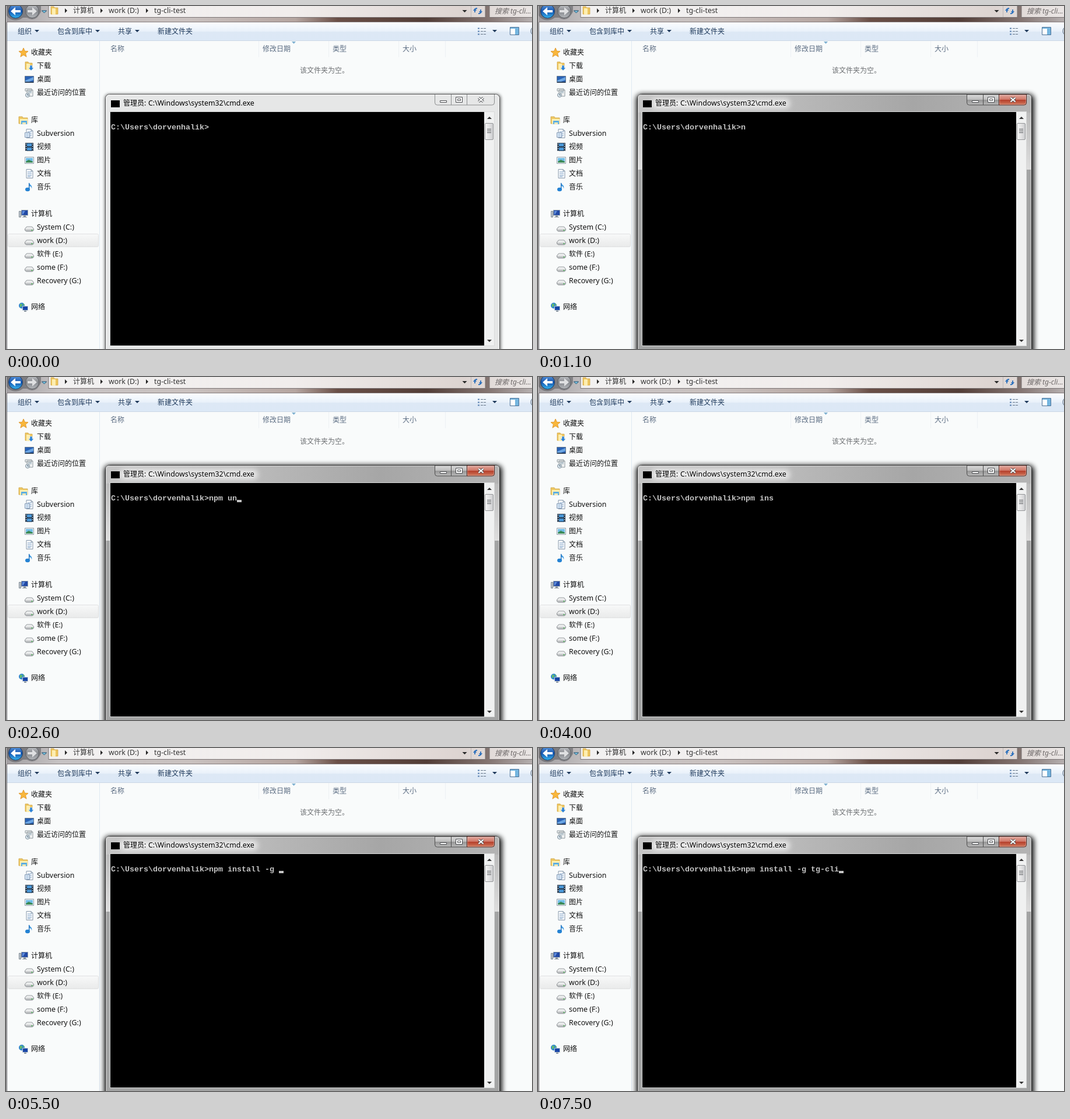
Write an HTML page that moves like this. It is 902 by 589 pixels and loops after 8000 ms.

```html
<!DOCTYPE html>
<html lang="zh">
<head>
<meta charset="utf-8">
<title>Console typing</title>
<style>
html, body { margin: 0; width: 100%; height: 100%; overflow: hidden; background: #f9fbfb; }
svg { display: block; }
text { font-family: "Noto Sans", "Noto Sans CJK SC", "Noto Sans CJK", sans-serif; white-space: pre; }
#line { font: bold 13.333px "Liberation Mono", monospace; fill: #c4c4c4; }
</style>
</head>
<body>
<svg id="stage" width="902" height="589" viewBox="0 0 902 589">
<defs>
  <linearGradient id="glass"><stop stop-color="#a19ea1"/><stop offset=".1" stop-color="#c6c2c3"/><stop offset=".35" stop-color="#c9c1bf"/><stop offset=".55" stop-color="#b5a5a0"/><stop offset=".63" stop-color="#6a4f47"/><stop offset=".8" stop-color="#523d37"/><stop offset=".92" stop-color="#857673"/><stop offset="1" stop-color="#b5afaf"/></linearGradient>
  <linearGradient id="field"><stop stop-color="#f2f1f1"/><stop offset=".5" stop-color="#f1edec"/><stop offset=".85" stop-color="#ddd4d1"/><stop offset="1" stop-color="#eae6e5"/></linearGradient>
  <linearGradient id="bar" x2="0" y2="1"><stop stop-color="#fbfdff"/><stop offset=".48" stop-color="#e9f1fa"/><stop offset=".52" stop-color="#dde8f5"/><stop offset="1" stop-color="#dce8f6"/></linearGradient>
  <linearGradient id="row" x2="0" y2="1"><stop stop-color="#f8f9f9"/><stop offset="1" stop-color="#e9eaea"/></linearGradient>
  <linearGradient id="blue" x2="0" y2="1"><stop stop-color="#5d9ade"/><stop offset=".5" stop-color="#1656b0"/><stop offset="1" stop-color="#35b4ee"/></linearGradient>
  <linearGradient id="steel" x2="0" y2="1"><stop stop-color="#c3c5c9"/><stop offset=".5" stop-color="#85888d"/><stop offset="1" stop-color="#b4b7bb"/></linearGradient>
  <linearGradient id="title"><stop stop-color="#c6c6c6"/><stop offset=".35" stop-color="#bcbcbc"/><stop offset=".7" stop-color="#a6a6a6"/><stop offset="1" stop-color="#b4b4b4"/></linearGradient>
  <linearGradient id="side" gradientUnits="userSpaceOnUse" x1="0" y1="180" x2="0" y2="281"><stop stop-color="#bababa"/><stop offset="1" stop-color="#dedede"/></linearGradient>
  <linearGradient id="red" x2="0" y2="1"><stop stop-color="#e2aaa0"/><stop offset=".47" stop-color="#d07767"/><stop offset=".53" stop-color="#b5402c"/><stop offset="1" stop-color="#d27a5e"/></linearGradient>
  <linearGradient id="button" x2="0" y2="1"><stop stop-color="#dadada"/><stop offset=".47" stop-color="#bdbdbd"/><stop offset=".53" stop-color="#969696"/><stop offset="1" stop-color="#b9b9b9"/></linearGradient>
  <linearGradient id="thumb"><stop stop-color="#f6f6f6"/><stop offset=".5" stop-color="#e3e3e4"/><stop offset="1" stop-color="#cbccce"/></linearGradient>
  <filter id="soft" x="-10%" y="-10%" width="120%" height="120%"><feGaussianBlur stdDeviation="4.5"/></filter>
  <filter id="faint" x="-10%" y="-10%" width="120%" height="120%"><feGaussianBlur stdDeviation="2.5"/></filter>
  <filter id="glow" x="-20%" y="-100%" width="140%" height="300%"><feGaussianBlur stdDeviation="5"/></filter>

  <path id="down" d="M-4-2h8l-4 4z"/>
  <path id="next" d="M-2-4l4 4-4 4z"/>
  <path id="cross" d="M810.500 157.500l8 7M818.500 157.500l-8 7"/>
  <path id="star" d="M8 0l2.300 5.400 5.700.4-4.400 3.700 1.500 5.800L8 12.100l-5.100 3.200 1.500-5.800L0 5.800l5.700-.4z" fill="#f9b73b" stroke="#d98c1d" stroke-width=".8"/>
  <g id="folder"><path d="M1 1h5l1 2h6v11H1z" fill="#edc65f" stroke="#cfa03c" stroke-width=".7"/><path d="M3 4h6v11H3z" fill="#fdeeb1"/></g>
  <g id="downloads"><use href="#folder"/><path d="M9 7h4v4h2.500L11 16 6.500 11H9z" fill="#2c83d8" stroke="#fff" stroke-width=".5"/></g>
  <g id="desktop"><path d="M.5 2.500h15v11H.5z" fill="#2a62b5" stroke="#66788d"/><path d="M1 10L15 4v5L5 13H1z" fill="#6ba5e2"/><path d="M1 12h14v1.500H1z" fill="#26384f"/></g>
  <g id="recent"><path d="M1 1h11v4H1zM4 3h10v11H4z" fill="#f0f2f2" stroke="#8f999e"/><path d="M6 6h6M6 8h6" stroke="#92aab8"/><circle cx="5" cy="12" r="3.500" fill="#dce9f1" stroke="#7c8b95"/><path d="M5 10v2h2" fill="none" stroke="#456"/></g>
  <g id="library"><path d="M0 2h6l1 2h8v10H0z" fill="#efc963" stroke="#c99d3c" stroke-width=".7"/><path d="M2 6h13v8H2z" fill="#fff0b5"/><path d="M4 9h10v6h-2v-3H6v3H4z" fill="#5daee2"/></g>
  <g id="page"><path d="M3 .5h8l3 3v12H3z" fill="#f8fafc" stroke="#8798ab"/><path d="M5 5h7M5 8h7M5 11h7M5 13h5" stroke="#7da0c6"/><path d="M11 .5v3h3" fill="none" stroke="#8798ab"/></g>
  <g id="stack"><use href="#page"/><path d="M.5 6.500h8v8h-8z" fill="#edf4fb" stroke="#7d96b5"/><path d="M2 9h5M2 12h5" stroke="#719cc9"/></g>
  <g id="video"><path d="M1 1h14v14H1z" fill="#26384c"/><path d="M4 2h8v5H4zM4 9h8v5H4z" fill="#4a96d5"/><path d="M2.500 2v13M13.500 2v13" stroke="#d5e1e9" stroke-dasharray="2 2"/></g>
  <g id="photo"><path d="M.5 2.500h15v11H.5z" fill="#fff" stroke="#8b9aa7"/><path d="M2 4h12v8H2z" fill="#72bde6"/><path d="M2 10l5-3 7 3v2H2z" fill="#3c8a58"/></g>
  <g id="music"><path d="M7 0c1 4 7 4 5 11 0-4-3-5-4-5v6" fill="#3d9ae2"/><path d="M7.700 1v11" stroke="#2372bd" stroke-width="1.500"/><ellipse cx="5" cy="12" rx="4" ry="3.300" fill="#2482d3"/></g>
  <g id="computer"><path d="M.5 3.500h3v10h-3z" fill="#c5ccd2" stroke="#79858e"/><path d="M4.500 1.500h11v9h-11z" fill="#2249a5" stroke="#9aa7b2"/><path d="M6 3h5l-4 6H6z" fill="#5f8dda"/><path d="M8 11h4v2h2v1H6v-1h2z" fill="#8b969f"/></g>
  <g id="drive"><path d="M.5 10.500l3-3.500h9l3 3.500v2.500l-2 2h-11l-2-2z" fill="#bfc2c4" stroke="#777d81" stroke-width=".8"/><path d="M1 10.500L4 7.500h8l3 3z" fill="#edefef"/><path d="M1 11h14" stroke="#f4f4f4"/><path d="M11.500 13h2" stroke="#38ac43" stroke-width="1.600"/></g>
  <g id="network"><circle cx="5" cy="5.500" r="5" fill="#3186d1"/><path d="M2 2l4 1-1 4-3 1zM7 1l3 3-2 2z" fill="#67bd68"/><path d="M6.500 6.500h9v7h-9z" fill="#1745a7" stroke="#bec8d1"/><path d="M9 14h4v2H9z" fill="#8995a0"/></g>
</defs>

<rect width="902" height="28" fill="url(#glass)"/>
<path d="M73-1h749v20.500H73zM829-1h80v20.500h-80z" fill="url(#field)" stroke="#7b7475"/>
<path d="M797.500 0v19" stroke="#bdb7b7"/>
<path d="M0 27.500h902" stroke="#857c7d"/>
<path d="M0 0h60v10q-4 7-7 10-8 6-17 0h-7q-13 9-25 0l-4-5z" fill="#4f5157" opacity=".5"/>
<circle cx="16.500" cy="9" r="12" fill="url(#blue)" stroke="#18345d"/>
<path d="M8 9l8-7v5h9v4h-9v5z" fill="#fff"/>
<circle cx="45" cy="9" r="11.500" fill="url(#steel)" stroke="#5a5d62"/>
<path d="M53 9l-8-7v5h-8v4h8v5z" fill="#dfe0e2"/>
<use href="#down" x="65.500" y="10" fill="#7fd0ee" stroke="#1e4969"/>
<use href="#folder" x="76"/>
<g fill="#262626"><use href="#next" x="103" y="8"/><use href="#next" x="164" y="8"/><use href="#next" x="242" y="8"/><use href="#down" x="786.500" y="9"/></g>
<path d="M804 11V7q0-3 4-3M814 6v4q0 3-4 3" fill="none" stroke="#2b70bd" stroke-width="1.800"/>
<path d="M801 8h6l-3-4zM811 9h6l-3 4z" fill="#2b70bd"/>

<rect y="28" width="902" height="32" fill="url(#bar)"/>
<path d="M0 59.500h902" stroke="#cbd7e5"/>
<g fill="#1e395b"><use href="#down" x="53" y="43"/><use href="#down" x="157" y="43"/><use href="#down" x="225" y="43"/><use href="#down" x="838" y="43"/></g>
<path d="M809 38.500h3M809 43.500h3M809 48.500h3" stroke="#5c82b1" stroke-width="2"/>
<path d="M814 38.500h10M814 43.500h10M814 48.500h10" stroke="#677789" stroke-dasharray="4 1"/>
<path d="M864.500 36.500h15v13h-15z" fill="#fff" stroke="#4b7196"/><path d="M865 37h14v2h-14zM873 39h6v10h-6z" fill="#75b5df"/>
<circle cx="908" cy="43" r="8" fill="#e8eef5" stroke="#566a82"/>

<rect y="60" width="902" height="529" fill="#f9fbfb"/>
<path d="M160.500 60v529" stroke="#dfe9f3"/>
<path d="M433.500 60v28M553.500 60v28M673.500 60v28M753.500 60v28" stroke="#edf1f4"/>
<path d="M490 61h7l-3.500 4z" fill="#7fb1d1"/>
<rect x="3.500" y="391.500" width="155" height="22" rx="2" fill="url(#row)" stroke="#dfe0e1"/>
<g id="labels"></g>
<path d="M.5 0v589" stroke="#c3bfc0"/><path d="M1.500 28v561" stroke="#5f6064"/>

<g id="idle">
  <rect x="169" y="151" width="680" height="460" rx="8" fill="#000" opacity=".5" filter="url(#faint)"/>
  <rect x="170.500" y="151.500" width="676" height="460" rx="7" fill="#e6e7e7" stroke="#515252"/>
  <rect x="171.500" y="152.500" width="674" height="460" rx="6" fill="none" stroke="#fafafa"/>
  <path d="M735.500 152v14q0 4 4 4h94q4 0 4-4v-14M763.500 152v18M790.500 152v18" fill="none" stroke="#8b8d8e"/>
</g>
<g id="active">
  <rect x="168" y="151" width="683" height="465" rx="9" fill="#000" opacity=".88" filter="url(#soft)"/>
  <rect x="170.500" y="151.500" width="676" height="460" rx="7" fill="#a3a4a4" stroke="#252525"/>
  <path d="M171 281V158q0-6 6-6h663q6 0 6 6v123z" fill="url(#side)"/>
  <path d="M171 183v-25q0-6 6-6h663q6 0 6 6v25z" fill="url(#title)"/>
  <rect x="171.500" y="152.500" width="674" height="460" rx="6" fill="none" stroke="#e3e3e3" opacity=".65"/>
  <rect x="195" y="159" width="237" height="17" rx="8" fill="#fff" opacity=".7" filter="url(#glow)"/>
  <path d="M735.500 152v14q0 4 4 4h51v-18z" fill="url(#button)" stroke="#4d4d4d"/>
  <path d="M763.500 152v18" stroke="#4d4d4d"/>
  <path d="M790.500 152v18h43q4 0 4-4v-14z" fill="url(#red)" stroke="#4e211b"/>
  <path d="M791.500 153v16h42q3 0 3-3v-13z" fill="none" stroke="#fff" opacity=".35"/>
</g>
<g fill="#fff" stroke="#4b4d50"><path d="M744.500 162.500h11v3h-11z"/><path d="M771.500 156.500h11v9h-11z"/><path d="M774.500 159.500h5v3h-5z"/></g>
<g stroke-width="4.200" stroke="#4b4d50"><use href="#cross"/></g>
<g stroke-width="2.200" stroke="#fff"><use href="#cross"/></g>
<rect x="180" y="162" width="15" height="12" fill="#000"/>
<text x="201" y="171" font-size="12">管理员:</text>
<text x="244" y="171" font-size="12.400">C:\Windows\system32\cmd.exe</text>
<rect x="178.500" y="181.500" width="659" height="402" fill="#000" stroke="#d9dada"/>
<rect x="820" y="182" width="17" height="401" fill="#f0f1f1"/>
<path d="M825 194h8l-4-4zM825 573h8l-4 4z" fill="#333"/>
<rect x="821.500" y="201.500" width="14" height="28" rx="1.500" fill="url(#thumb)" stroke="#939597"/>
<path d="M825 211.500h7M825 214.500h7M825 217.500h7" stroke="#55585b"/>
<text id="line" x="180" y="212"></text>
<rect id="cursor" y="211" width="8" height="4" fill="#c4c4c4"/>
</svg>
<script>
const $ = id => document.getElementById(id);
const LOOP = 8000, FOCUS_AT = 200, CELL = 8, LEFT = 180;
const PROMPT = 'C:\\Users\\dorvenhalik>';

// Typed text by start time; a trailing underscore means the caret is lit.
const typing = [
  [0, ''], [700, '_'], [1100, 'n'], [1200, 'n_'], [1300, 'np'], [1700, 'np_'],
  [1800, 'npm'], [2100, 'npm_'], [2200, 'npm '], [2300, 'npm u'], [2500, 'npm un'],
  [2600, 'npm un_'], [2900, 'npm u'], [3100, 'npm _'], [3600, 'npm i'], [3700, 'npm in'],
  [4000, 'npm ins'], [4100, 'npm inst'], [4200, 'npm insta'], [4400, 'npm instal'],
  [4500, 'npm install'], [4900, 'npm install -'], [5100, 'npm install -_'],
  [5200, 'npm install -g'], [5500, 'npm install -g _'], [6000, 'npm install -g t_'],
  [6200, 'npm install -g tg'], [6500, 'npm install -g tg_'], [6700, 'npm install -g tg-'],
  [6900, 'npm install -g tg-c'], [7000, 'npm install -g tg-cl'],
  [7200, 'npm install -g tg-cli'], [7500, 'npm install -g tg-cli_']
];

function label(text, x, middle, fill = '#111', extra = '') {
  const size = /^[ -~]/.test(text) ? 12.4 : 12;
  return `<text x="${x}" y="${middle + 4}" font-size="${size}" fill="${fill}" ${extra}>${text}</text>`;
}

function navGroup(top, heading, icon, items) {
  const head = `<use href="#${icon}" x="22" y="${top - 8}"/>` + label(heading, 43, top);
  return head + items.map(([text, symbol], i) => {
    const y = top + 23 * (i + 1);
    return `<use href="#${symbol}" x="32" y="${y - 8}"/>` + label(text, 53, y);
  }).join('');
}

const navy = '#1e395b', slate = '#5b6c82', ink = '#343434';
$('labels').innerHTML = [
  label('计算机', 115, 8, ink), label('work (D:)', 176, 8, ink), label('tg-cli-test', 254, 8, ink),
  label('搜索 tg-cli...', 838, 9, '#6d6868', 'font-style="italic"'),
  label('组织', 20, 44, navy), label('包含到库中', 88, 44, navy),
  label('共享', 192, 44, navy), label('新建文件夹', 260, 44, navy),
  label('名称', 179, 74, slate), label('修改日期', 440, 74, slate),
  label('类型', 560, 74, slate), label('大小', 680, 74, slate),
  label('该文件夹为空。', 504, 111, '#6d7073'),
  navGroup(80, '收藏夹', 'star', [['下载', 'downloads'], ['桌面', 'desktop'], ['最近访问的位置', 'recent']]),
  navGroup(196, '库', 'library', [['Subversion', 'stack'], ['视频', 'video'], ['图片', 'photo'], ['文档', 'page'], ['音乐', 'music']]),
  navGroup(357, '计算机', 'computer', ['System (C:)', 'work (D:)', '软件 (E:)', 'some (F:)', 'Recovery (G:)'].map(name => [name, 'drive'])),
  navGroup(517, '网络', 'network', [])
].join('');

function show(id, visible) {
  $(id).setAttribute('visibility', visible ? 'visible' : 'hidden');
}

function render(time) {
  const t = time % LOOP;
  const entry = typing.findLast(([start]) => start <= t)[1];
  const text = PROMPT + entry.replace('_', '');
  $('line').textContent = text;
  $('cursor').setAttribute('x', LEFT + text.length * CELL);
  show('cursor', entry.endsWith('_'));
  show('active', t >= FOCUS_AT);
  show('idle', t < FOCUS_AT);
}

const began = performance.now();
function tick() {
  render(performance.now() - began);
  requestAnimationFrame(tick);
}
tick();
</script>
</body>
</html>
```
